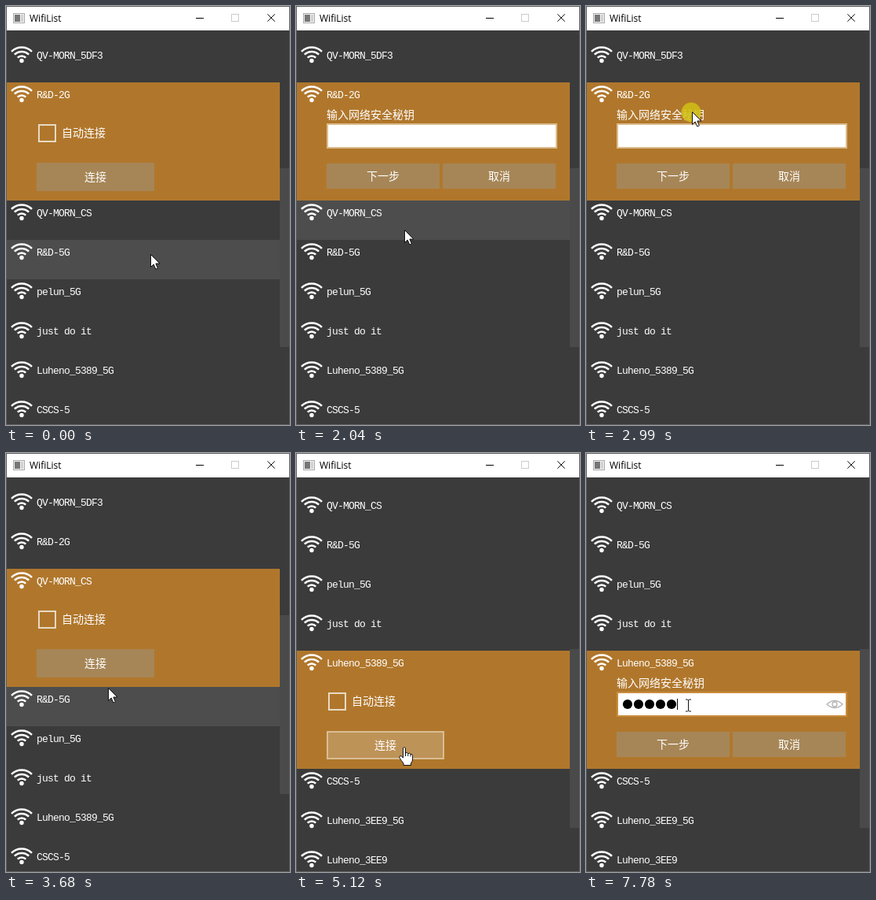
These frames come from a looping animation (362 px wide and 532 px high, 8000 ms). An HTML page:

```html
<!DOCTYPE html>
<html lang="zh">
<head>
<meta charset="utf-8">
<title>WifiList</title>
<style>
  html, body { margin: 0; width: 100%; height: 100%; overflow: hidden; background: #3b3b3b; }
  svg { display: block; }
  text { white-space: pre; }
  .ssid { font: 13px "Liberation Mono", monospace; letter-spacing: -0.8px; fill: #fff; }
  .zh { font: 14px "Noto Sans CJK SC", "Noto Sans CJK", sans-serif; fill: #fff; }
  .title { font: 12px "Open Sans", "Noto Sans", sans-serif; fill: #000; }
  .mid { text-anchor: middle; }
</style>
</head>
<body>
<svg width="362" height="532" viewBox="0 0 362 532">
  <defs>
    <clipPath id="view"><rect x="1" y="31" width="348" height="500"/></clipPath>
    <g id="wifi" fill="none" stroke="#fff" stroke-width="2.5"></g>
    <path id="arrow" d="M.5 .5V16.5L4.2 13L6.8 19L9.4 17.9L6.9 12H12Z" fill="#fff" stroke="#111"/>
    <g id="hand" stroke="#111" stroke-linejoin="round">
      <path d="M-1.5 .5Q0-1.5 1.5 .5V7Q3.5 5.5 4.8 7.6Q6.6 6.4 8 8.4Q10.5 7.8 10.6 10.5V15Q10.4 18 8.5 20V22.5H-1V20Q-3.6 17-6.2 12.6Q-6.3 10.3-4 10.6L-1.5 13Z" fill="#fff"/>
      <path d="M1.5 7V11M4.8 7.8V11M8 8.6V11.5" fill="none"/>
    </g>
    <path id="beam" d="M-3-7H-.5L.5-6L1.5-7H4M.5-6V7M-3 8H-.5L.5 7L1.5 8H4" fill="none" stroke="#111"/>
  </defs>
  <rect width="362" height="532" fill="#5e5e5e"/>
  <rect x="1" y="1" width="360" height="30" fill="#fff"/>
  <rect x="9.5" y="9.5" width="14" height="12" fill="#f2f2f2" stroke="#aaa"/>
  <rect x="11" y="11" width="7" height="9" fill="#777"/>
  <rect x="19" y="11" width="3" height="9" fill="#d0d0d0"/>
  <text class="title" x="30" y="20">WifiList</text>
  <g fill="none">
    <path d="M242 15.5H252" stroke="#000"/>
    <rect x="287.5" y="10.5" width="9" height="9" stroke="#ccc"/>
    <path d="M333.3 10.3L342.7 19.7M342.7 10.3L333.3 19.7" stroke="#111"/>
  </g>
  <rect x="1" y="31" width="360" height="500" fill="#3b3b3b"/>
  <g id="live"></g>
</svg>
<script>
const LOOP = 8000, TICK = 70;
const ROW = 50, OPEN = 150, TOP = 47, NOTCH = 48;
const REST = 270, PRESS = 180, PACE = 6;        // ms before a click, ms held, ms per pixel
const TYPING = 6560, KEY_GAP = 305, DOTS = 5;

const names = ["QV-MORN_5DF3", "R&amp;D-2G", "QV-MORN_CS", "R&amp;D-5G", "pelun_5G", "just do it",
  "Luheno_5389_5G", "CSCS-5", "Luheno_3EE9_5G", "Luheno_3EE9"];

// What the user does: the pointer glides to each place in time for the action.
const acts = [
  { at: 1020, x: 138, y: 233, kind: "click" },
  { at: 2110, x: 138, y: 284, kind: "click" },
  { at: 2940, x: 135, y: 134, kind: "click" },
  { at: 3330, x: 135, y: 275, kind: "click" },
  { at: 3960, x: 127, y: 310, kind: "wheel" },
  { at: 4290, x: 127, y: 310, kind: "wheel" },
  { at: 4710, x: 138, y: 374, kind: "click" },
  { at: 5330, x: 138, y: 374, kind: "click" },
  { at: 5900, x: 104, y: 328, kind: "pass" },
  { at: 6220, x: 130, y: 320, kind: "click" },
];

// Controls of an open row, relative to its top
const box = (x, y, w, h) => ({ x, y, w, h });
const CONNECT = box(39, 102, 150, 36), FIELD = box(39, 52, 294, 32);
const NEXT = box(39, 103, 144, 32), CANCEL = box(187, 103, 144, 32);

const live = document.getElementById("live");
const inside = (p, b, top) => p.x >= b.x && p.x < b.x + b.w && p.y >= top + b.y && p.y < top + b.y + b.h;

function pointerAt(time) {
  const t = Math.floor(time / TICK) * TICK;
  let last = { at: -PRESS, x: 184, y: 315 };
  for (const a of acts) {
    const leave = last.at + PRESS, dist = Math.hypot(a.x - last.x, a.y - last.y);
    const glide = Math.min(PACE * dist, a.at - TICK - leave);
    const start = Math.max(leave, a.at - REST - glide);
    if (t < start + glide) {
      const u = Math.max(0, (t - start) / glide), e = u * u * (3 - 2 * u);
      return { x: Math.round(last.x + (a.x - last.x) * e), y: Math.round(last.y + (a.y - last.y) * e) };
    }
    last = a;
  }
  return { x: last.x, y: last.y };
}

function layout(ui) {
  let y = TOP - ui.scroll;
  return names.map((name, i) => {
    const row = { name, i, x: 1, y, w: 348, h: i === ui.open ? OPEN : ROW };
    y += row.h;
    return row;
  });
}

function click(ui, a) {
  const row = layout(ui).find(r => inside(a, r, 0));
  if (row.i !== ui.open) ui.open = row.i;
  else if (!ui.forms.has(row.i)) {
    if (inside(a, CONNECT, row.y)) ui.forms.add(row.i);
  } else if (inside(a, FIELD, row.y)) ui.focus = a.at;
}

function uiAt(t) {
  const ui = { open: 1, scroll: 0, forms: new Set(), focus: null, pressed: false };
  for (const a of acts.filter(a => a.at <= t)) {
    if (a.kind === "wheel") ui.scroll += NOTCH;
    if (a.kind === "click") {
      click(ui, a);
      ui.pressed = t < a.at + PRESS;
    }
  }
  ui.dots = t < TYPING ? 0 : Math.min(DOTS, 1 + Math.floor((t - TYPING) / KEY_GAP));
  return ui;
}

const rect = (x, y, w, h, fill) => `<rect x="${x}" y="${y}" width="${w}" height="${h}" fill="${fill}"/>`;
const frame = (x, y, w, h, fill, line) =>
  `<rect x="${x + 1}" y="${y + 1}" width="${w - 2}" height="${h - 2}" fill="${fill}" stroke="${line}" stroke-width="2"/>`;
const label = (kind, x, y, words) => `<text class="${kind}" x="${x}" y="${y}">${words}</text>`;
const use = (id, x, y) => `<use href="#${id}" x="${x}" y="${y}"/>`;

function button(p, top, b, words) {
  const hot = inside(p, b, top), y = top + b.y;
  if (hot) p.shape = "hand";
  return (hot ? frame(b.x, y, b.w, b.h, "#be9358", "#d9bd93") : rect(b.x, y, b.w, b.h, "#a68657")) +
    label("zh mid", b.x + b.w / 2, y + b.h / 2 + 5, words);
}

function field(p, top, ui, t) {
  const y = top + FIELD.y, mid = y + FIELD.h / 2, focused = ui.focus !== null;
  if (inside(p, FIELD, top)) p.shape = "beam";
  let out = frame(FIELD.x, y, FIELD.w, FIELD.h, "#fff", focused ? "#c98c3c" : "#dcbc8c");
  for (let i = 0; i < ui.dots; i++) out += `<circle cx="${53 + 14 * i}" cy="${mid}" r="6.1"/>`;
  if (focused) {
    const lastKey = TYPING + (ui.dots - 1) * KEY_GAP;
    const since = t - (ui.dots ? lastKey : ui.focus);
    if (since % 1060 < 530) out += rect(46 + 14 * ui.dots, mid - 7, 1, 14, "#000");
  }
  if (ui.dots) {
    out += `<g fill="none" stroke="#b4b4b4" stroke-width="1.3">
      <path d="M307 ${mid}Q317 ${mid - 9} 327 ${mid}Q317 ${mid + 9} 307 ${mid}Z"/>
      <circle cx="317" cy="${mid}" r="3"/></g>`;
  }
  return out;
}

function panel(p, row, ui, t) {
  const y = row.y;
  if (ui.forms.has(row.i)) {
    return label("zh", 39, y + 46, "输入网络安全秘钥") + field(p, y, ui, t) +
      button(p, y, NEXT, "下一步") + button(p, y, CANCEL, "取消");
  }
  return frame(41, y + 53, 23, 23, "none", "#e8dac4") + label("zh", 71, y + 69, "自动连接") +
    button(p, y, CONNECT, "连接");
}

function scene(t) {
  const p = pointerAt(t), ui = uiAt(t);
  p.shape = "arrow";
  let out = `<g clip-path="url(#view)">`;
  for (const row of layout(ui)) {
    const open = row.i === ui.open;
    if (open) out += rect(row.x, row.y, row.w, row.h, "#b0772c");
    else if (inside(p, row, 0)) out += rect(row.x, row.y, row.w, row.h, "#4d4d4d");
    out += use("wifi", 0, row.y) + label("ssid", 39, row.y + 20, row.name);
    if (open) out += panel(p, row, ui, t);
  }
  out += "</g>" + rect(349, 206 + Math.round(ui.scroll * 0.45), 12, 227, "#4a4a4a");
  if (ui.pressed) out += `<circle cx="${p.x - 1}" cy="${p.y + 1}" r="12.5" fill="#d0c014" fill-opacity=".85"/>`;
  // The pointer hides during fast typing.
  if (ui.dots === 0 || ui.dots >= DOTS - 1) out += use(p.shape, p.x, p.y);
  return out;
}

// Three quarter-circle waves over a dot
const waves = [7.4, 12.9, 18.4].map(r => {
  const d = r * Math.SQRT1_2, y = 23.8 - d;
  return `<path d="M${20 - d} ${y}A${r} ${r} 0 0 1 ${20 + d} ${y}"/>`;
});
document.getElementById("wifi").innerHTML =
  waves.join("") + `<circle cx="20" cy="22.5" r="2.7" fill="#fff" stroke="none"/>`;

let shown = "";
const start = performance.now();
function tick() {
  const next = scene((performance.now() - start) % LOOP);
  if (next !== shown) live.innerHTML = shown = next;
  requestAnimationFrame(tick);
}
tick();
</script>
</body>
</html>
```
